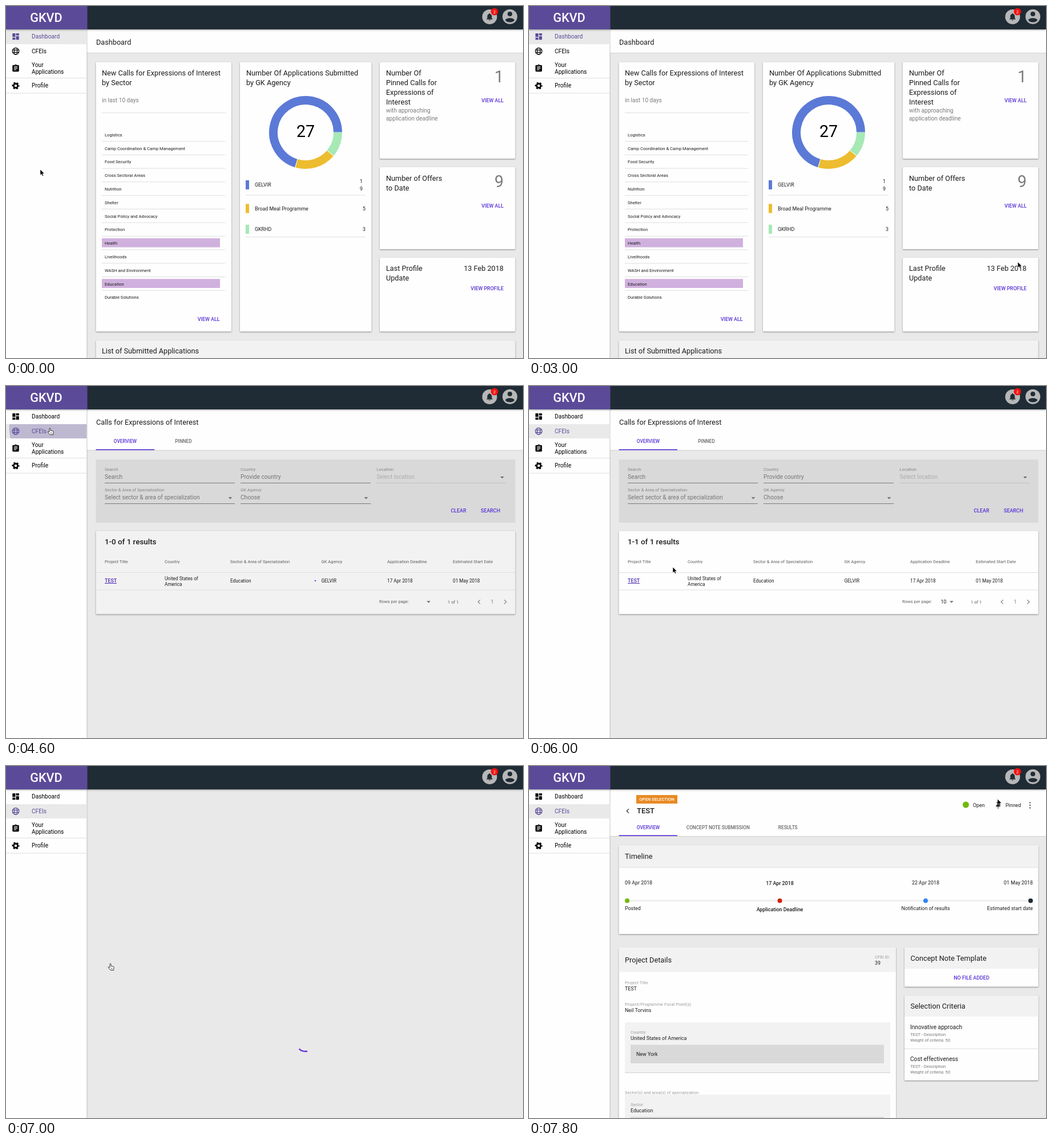
Write an HTML page that moves like this. It is 906x618 px and loops after 8 s.

```html
<!DOCTYPE html>
<html lang="en">
<head>
<meta charset="utf-8">
<title>Partner portal</title>
<style>
html, body { margin: 0; height: 100%; overflow: hidden; background: #e9e9e9; }
svg { display: block; width: 100vw; height: 100vh; font-family: Roboto, sans-serif; }
.card { filter: drop-shadow(0 1px 1.2px rgba(0, 0, 0, .42)); }
.bar { filter: drop-shadow(0 1px 1.5px rgba(0, 0, 0, .4)); }
.side { filter: drop-shadow(.6px 0 .8px rgba(0, 0, 0, .4)); }
</style>
</head>
<body>
<svg id="stage" viewBox="0 0 906 618"></svg>
<script>
const LOOP = 8000, STEP = 200;
const INK = '#1c1c1c', GREY = '#7b7b7b', PALE = '#9c9c9c', LINK = '#5730d6', PURPLE = '#5b4a98';
const TITLE = 12.7, BODY = 10.16, SMALL = 8.89, CELL = 8.26, TINY = 7.64, BIG = 28.6;

// y is the middle of the capitals
const text = (x, y, size, str, fill = INK, weight = 400, anchor = 'start') =>
  `<text x="${x}" y="${y + size * .36}" font-size="${size}" fill="${fill}" font-weight="${weight}" text-anchor="${anchor}">${str.replace(/&/g, '&amp;')}</text>`;
const lines = (x, y, gap, size, rows, fill) =>
  rows.map((row, i) => text(x, y + i * gap, size, row, fill)).join('');
const link = (x, y, str, anchor = 'end', size = SMALL) => text(x, y, size, str, LINK, 500, anchor);
const rect = (x, y, x2, y2, fill, extra = '') =>
  `<rect x="${x}" y="${y}" width="${x2 - x}" height="${y2 - y}" fill="${fill}" ${extra}/>`;
const card = (x, y, x2, y2, fill = '#fefefe') => rect(x, y, x2, y2, fill, 'class="card" rx="1"');
const rule = (x, x2, y, color = '#dedede', extra = '') =>
  `<path d="M${x} ${y}H${x2}" stroke="${color}" ${extra}/>`;
const dot = (x, y, r, fill) => `<circle cx="${x}" cy="${y}" r="${r}" fill="${fill}"/>`;
const shape = (d, x, y, fill, scale = 1, extra = '') =>
  `<path d="${d}" transform="translate(${x} ${y}) scale(${scale})" fill="${fill}" ${extra}/>`;
const caret = (x, y) => shape('M-3.3-1.6H3.3L0 1.7z', x, y, '#666');
const chevron = (x, y, dir, color = '#888') =>
  shape(`M${-2 * dir}-3.6L${1.8 * dir} 0L${-2 * dir} 3.6`, x, y, 'none', 1, `stroke="${color}" stroke-width="1.3"`);

function arc(cx, cy, r, from, to, color, width) {
  const at = deg => {
    const a = deg * Math.PI / 180;
    return `${cx + r * Math.cos(a)} ${cy + r * Math.sin(a)}`;
  };
  return `<path d="M${at(from)}A${r} ${r} 0 ${to - from > 180 ? 1 : 0} 1 ${at(to)}" fill="none" stroke="${color}" stroke-width="${width}"/>`;
}

function spinner(cx, cy, ms, turn = 0) {
  const grow = (1 - Math.cos(Math.PI * Math.min(1, ms / 700))) / 2;
  const start = turn + ms / 1400 * 360 + grow * 43;
  return arc(cx, cy, 17, start, start + 6 + grow * 250, '#6a35e0', 2.4);
}

const ICONS = {
  board: 'M3 13h8V3H3zm0 8h8v-6H3zm10 0h8V11h-8zm0-18v6h8V3z',
  clip: 'M19 3h-4.2a3 3 0 0 0-5.6 0H5a2 2 0 0 0-2 2v14a2 2 0 0 0 2 2h14a2 2 0 0 0 2-2V5a2 2 0 0 0-2-2zm-7 0a1 1 0 0 1 0 2 1 1 0 0 1 0-2zm2 14H7v-2h7zm3-4H7v-2h10zm0-4H7V7h10z',
  bell: 'M12 22a2 2 0 0 0 2-2h-4a2 2 0 0 0 2 2zm6-6v-5c0-3.1-1.6-5.6-4.5-6.3V4a1.5 1.5 0 0 0-3 0v.7C7.6 5.4 6 7.9 6 11v5l-2 2v1h16v-1z',
  pin: 'M8 3h8v2h-1v6l3 3v2h-5.2v6h-1.6v-6H6v-2l3-3V5H8z'
};
const globe = (x, y, color) => `<g transform="translate(${x} ${y})" fill="none" stroke="${color}" stroke-width="1.2">
  <circle r="5.8"/><ellipse rx="2.6" ry="5.8"/><path d="M-5.2-2H5.2M-5.2 2H5.2"/></g>`;
const gear = (x, y) => `<g transform="translate(${x} ${y})" fill="none" stroke="#000">
  <circle r="3.6" stroke-width="2.6"/><circle r="5.4" stroke-width="2.2" stroke-dasharray="2.9 2.755" stroke-dashoffset="1.45"/></g>`;

const SECTORS = ['Logistics', 'Camp Coordination & Camp Management', 'Food Security', 'Cross Sectoral Areas',
  'Nutrition', 'Shelter', 'Social Policy and Advocacy', 'Protection', 'Health', 'Livelihoods',
  'WASH and Environment', 'Education', 'Durable Solutions'];

function dashboard() {
  const sectors = SECTORS.map((name, i) => {
    const y = 226 + 23.8 * i;
    const mark = name === 'Health' || name === 'Education' ? rect(168, y - 8.6, 375, y + 7.2, '#d0b1de') : '';
    return mark + text(173, y, TINY, name) + (i < 12 ? rule(168, 384, y + 11.5) : '');
  }).join('');
  const agencies = [['Broad Meal Programme', 355.5, '#edbc2f', '5'], ['GKRHD', 392, '#a6e9b5', '3']]
    .map(([name, y, color, n]) => rect(420, y - 8, 426, y + 8, color) + text(436, y, SMALL, name) + text(630, y, SMALL, n, INK, 400, 'end'))
    .join('');
  return rect(142, 41, 906, 82, '#fefefe') + rule(142, 906, 82.5, '#d2d2d2') + text(158, 63.5, TITLE, 'Dashboard')
    + card(157.5, 98.5, 395, 571.5)
    + lines(168, 117.5, 17, TITLE, ['New Calls for Expressions of Interest', 'by Sector'])
    + text(168, 165, BODY, 'in last 10 days', GREY) + rule(168, 385, 187.5) + sectors + link(374.5, 549.5, 'VIEW ALL')
    + card(410, 98.5, 640.5, 571.5)
    + lines(421, 117.5, 17, TITLE, ['Number Of Applications Submitted', 'by GK Agency'])
    + arc(525, 222, 56.5, 0, 39.5, '#a6e9b5', 15) + arc(525, 222, 56.5, 40.5, 106.2, '#edbc2f', 15)
    + arc(525, 222, 56.5, 107.2, 359.5, '#5b79d6', 15) + text(525, 220, 28.6, '27', '#000', 400, 'middle')
    + rect(420, 306, 426, 322, '#5b79d6') + text(436, 314, SMALL, 'GELVIR') + lines(620, 307.5, 13, SMALL, ['1', '9'])
    + agencies + rule(420, 630, 332) + rule(420, 630, 405.5)
    + card(655, 98.5, 892.5, 268)
    + lines(666, 117.5, 17, TITLE, ['Number Of', 'Pinned Calls for', 'Expressions of', 'Interest'])
    + lines(666, 183.5, 13.5, BODY, ['with approaching', 'application deadline'], GREY)
    + text(872, 123.5, BIG, '1', GREY, 400, 'end') + link(872, 166, 'VIEW ALL')
    + card(655, 283, 892.5, 427) + lines(666, 302, 17, TITLE, ['Number of Offers', 'to Date'])
    + text(872, 308, BIG, '9', GREY, 400, 'end') + link(872, 351, 'VIEW ALL')
    + card(655, 442, 892.5, 571.5) + lines(666, 460.5, 17, TITLE, ['Last Profile', 'Update'])
    + text(872, 460.5, TITLE, '13 Feb 2018', INK, 400, 'end') + link(872, 495.5, 'VIEW PROFILE')
    + card(157.5, 587, 892.5, 640, '#f2f2f2') + text(168, 605, TITLE, 'List of Submitted Applications');
}

function field(x, y, label, hint, options = {}) {
  const faded = options.disabled;
  return text(x, y, TINY, label, '#858585') + text(x, y + 13.5, BODY, hint, faded ? '#ababab' : '#757575')
    + rule(x, x + 228, y + 24.3, faded ? '#999' : '#777', faded ? 'stroke-dasharray="1.2 1.8"' : '')
    + (options.menu ? caret(x + 220, y + 14.5) : '');
}

const tab = (x, y, name, active) => text(x, y, CELL, name, active ? LINK : '#686868', 500, 'middle');

function calls(t) {
  const loading = t < 5000;
  const heads = [[173, 'Project Title'], [278, 'Country'], [393, 'Sector & Area of Specialization'], [552.5, 'GK Agency'],
    [668, 'Application Deadline'], [783, 'Estimated Start Date']];
  const cells = [[393, 'Education'], [552.5, 'GELVIR'], [668, '17 Apr 2018'], [783, '01 May 2018']];
  return rect(142, 41, 906, 112.5, '#fefefe') + rule(142, 906, 113, '#d2d2d2')
    + text(158, 63.5, TITLE, 'Calls for Expressions of Interest')
    + tab(209, 97.5, 'OVERVIEW', true) + tab(311, 97.5, 'PINNED') + rect(157.5, 111, 260, 112.6, LINK)
    + rect(157.5, 129, 892.5, 240, '#d9d9d9')
    + field(173, 146, 'Search', 'Search') + field(411, 146, 'Country', 'Provide country')
    + field(649.5, 146, 'Location', 'Select location', { menu: true, disabled: true })
    + field(173, 182.3, 'Sector & Area of Specialization', 'Select sector & area of specialization', { menu: true })
    + field(411, 182.3, 'GK Agency', 'Choose', { menu: true })
    + link(793, 218.5, 'CLEAR', 'middle') + link(849, 218.5, 'SEARCH', 'middle')
    + card(157.5, 254.5, 892.5, 400.5, loading ? '#f2f2f2' : '#fefefe')
    + text(173, 273, 13.4, `1-${loading ? 0 : 1} of 1 results`, INK, 500)
    + heads.map(([x, name]) => text(x, 308.5, TINY, name, '#5c5c5c')).join('')
    + rule(157.5, 892.5, 327.5) + text(173, 342, SMALL, 'TEST', '#4d2bb0', 500) + rule(173, 194, 346.5, '#4d2bb0')
    + lines(278, 338, 10, CELL, ['United States of', 'America'])
    + cells.map(([x, name]) => text(x, 342.3, CELL, name)).join('') + rule(157.5, 892.5, 358)
    + text(654, 378.5, TINY, 'Rows per page:', '#5c5c5c') + (loading ? '' : text(721.5, 378.5, SMALL, '10'))
    + caret(740.5, 379) + text(774, 379, TINY, '1 of 1', '#5c5c5c')
    + chevron(829, 379, -1) + text(852, 379, SMALL, '1', GREY, 400, 'middle') + chevron(875, 379, 1)
    + (loading ? spinner(525, 341, t - 4600) : '');
}

const panel = (x, y, x2, y2, head, title) => card(x, y, x2, y2) + rect(x, y, x2, head, '#f2f2f2')
  + text(x + 10.5, (y + head) / 2, TITLE, title);

function details() {
  const steps = [[172, 168, '09 Apr 2018', 'Posted', '#70b90a', 'start'], [439.5, 439.5, '17 Apr 2018', 'Application Deadline', '#d4200c', 'middle'],
    [695, 695, '22 Apr 2018', 'Notification of results', '#2f86f5', 'middle'], [879, 883, '01 May 2018', 'Estimated start date', '#1f2c35', 'end']];
  const pair = (x, y, label, value) => text(x, y, TINY, label, PALE) + text(x, y + 10.4, SMALL, value);
  const criterion = (y, name) => text(668, y, BODY, name)
    + lines(668, y + 12.3, 10, TINY, ['TEST - Description', 'Weight of criteria: 50'], '#777');
  return rect(142, 41, 906, 123, '#fefefe') + rule(142, 906, 123.5, '#d2d2d2')
    + rect(188, 51, 260, 66, '#e88a23') + text(224, 58.7, TINY, 'OPEN SELECTION', '#fff', 500, 'middle')
    + chevron(173, 79, -1, '#333') + text(189, 78.5, 13, 'TEST', INK, 500)
    + tab(209, 108, 'OVERVIEW', true) + tab(331.3, 108, 'CONCEPT NOTE SUBMISSION') + tab(453.7, 108, 'RESULTS')
    + rect(157.5, 121.4, 260, 123, LINK)
    + dot(765.5, 68, 5.5, '#70b90a') + text(778, 69, SMALL, 'Open') + shape(ICONS.pin, 814.4, 61, '#222', .635)
    + text(835, 69, SMALL, 'Pinned') + [64.5, 69, 73.5].map(y => dot(878, y, 1.3, '#666')).join('')
    + panel(157.5, 139, 892.5, 295, 178, 'Timeline') + rule(157.5, 892.5, 178) + rect(172, 235, 879, 238, '#eee')
    + steps.map(([x, tx, date, name, color, anchor], i) => {
      const shift = i === 1 ? 1.5 : 0, weight = shift ? 500 : 400;
      return dot(x, 236.5, 4, color) + text(tx, 204.5 + shift, SMALL, date, INK, weight, anchor)
        + text(tx, 250 + shift, SMALL, name, INK, weight, anchor);
    }).join('')
    + panel(157.5, 318.5, 643, 640, 362, 'Project Details') + pair(606, 335, 'CFEI ID:', '39')
    + pair(168, 380, 'Project Title', 'TEST') + pair(168, 418, 'Project/Programme Focal Point(s)', 'Neil Torvins')
    + rect(168, 450, 633, 538, '#f2f2f2') + rule(168, 633, 538.5, '#d0d0d0')
    + pair(178, 467, 'Country', 'United States of America')
    + rect(178, 489.5, 622, 522, '#d9d9d9') + text(188, 506, SMALL, 'New York')
    + text(168, 573, TINY, 'Sector(s) and area(s) of specialization', PALE)
    + rect(168, 577, 633, 618, '#f2f2f2') + pair(178, 594, 'Sector', 'Education') + rect(178, 616, 622, 618, '#d9d9d9')
    + panel(658, 318.5, 892.5, 387.5, 356, 'Concept Note Template') + link(775.5, 372, 'NO FILE ADDED', 'middle')
    + panel(658, 403, 892.5, 552, 440, 'Selection Criteria')
    + criterion(458.5, 'Innovative approach') + rule(658, 892.5, 496.5) + criterion(514.5, 'Cost effectiveness');
}

function chrome(t) {
  const home = t < 4600, onCalls = t >= 4200;
  const tint = on => on ? PURPLE : '#000';
  const row = (y, y2, on) => on ? rect(0, y, 141.5, y2, '#e9e9e9') : '';
  const [radius, alpha] = { 4400: [5.5, .35], 4600: [71.5, .3], 4800: [82, .13] }[t] || [0, 0];
  return rect(0, 41, 141.5, 618, '#fefefe', 'class="side"')
    + row(41, 67, home) + row(67, 92, onCalls)
    + `<clipPath id="row"><rect y="67" width="141.5" height="25"/></clipPath>`
    + `<circle cx="77" cy="74" r="${radius}" fill="${PURPLE}" opacity="${alpha}" ${t > 4400 ? 'clip-path="url(#row)"' : ''}/>`
    + shape(ICONS.board, 9.4, 46, tint(home), .635) + text(45, 53.5, BODY, 'Dashboard', tint(home))
    + globe(17, 79.3, tint(onCalls)) + text(45, 79, BODY, 'CFEIs', tint(onCalls))
    + shape(ICONS.clip, 9.4, 101.8, '#000', .635) + lines(45, 103, 12.3, BODY, ['Your', 'Applications'], '#000')
    + rule(0, 141.5, 126.5) + gear(17, 140) + text(45, 139.5, BODY, 'Profile', '#000') + rule(0, 141.5, 153)
    + rect(0, 0, 906, 41, '#1f2c35', 'class="bar"') + rect(0, 0, 142.5, 41, PURPLE)
    + text(70.5, 20, 21.6, 'GKVD', '#fff', 500, 'middle')
    + dot(847.5, 19, 13, '#b7b7b7') + shape(ICONS.bell, 839.5, 11, '#1f2c35', .66)
    + dot(856, 10, 6.3, '#f3120e') + text(856, 10, 7.2, '2', '#fff', 400, 'middle')
    + dot(883, 18.7, 13, '#b7b7b7') + dot(883, 14, 4.1, '#1f2c35')
    + shape('M-8 3.6C-7-1.3 7-1.3 8 3.6C5 8.4-5 8.4-8 3.6z', 883, 21.3, '#1f2c35');
}

// time, x, y of the pointer
const PATH = [[0, 60, 287], [400, 60, 287], [1600, 861, 157], [1800, 861, 157], [2400, 861, 342], [2600, 861, 342],
  [3200, 855, 487], [3400, 855, 487], [4200, 77, 74], [4800, 77, 74], [6000, 252, 318], [6600, 183, 347],
  [7200, 183, 347], [7800, 821, 58], [8000, 821, 58]];

function pointer(t) {
  const i = PATH.findIndex(key => key[0] > t);
  const [t0, x0, y0] = PATH[i - 1], [t1, x1, y1] = PATH[i];
  const p = (t - t0) / (t1 - t0), e = p * p * (3 - 2 * p);
  const x = x0 + (x1 - x0) * e, y = y0 + (y1 - y0) * e;
  const hand = (t >= 4200 && t <= 4800) || (t >= 6600 && t <= 7200);
  return hand
    ? shape('M-1 1a1 1 0 0 1 2 0v3.2l4 .8q1.4.3 1.2 1.6L5.6 10v1.5H.2L-3.6 7.2q-.8-1.4.8-1.4L-1 7z', x, y, '#fff', 1,
      'stroke="#222" stroke-width=".9"') + shape('M1.4 7.4v2.4M3.2 7.4v2.4', x, y, 'none', 1, 'stroke="#222" stroke-width=".6"')
    : shape('M0 0V10l2.3-2.1L4 11.6l1.6-.7L4 7.3h3.2z', x, y, '#000', 1, 'stroke="#fff" stroke-width=".5"');
}

function scene(t) {
  if (t < 4600) return dashboard();
  if (t < 6800) return calls(t);
  return t < 7200 ? spinner(525, 484, t - 6800, 20) : details();
}

const stage = document.getElementById('stage');
const begin = performance.now();
let shown = -1;
function draw() {
  const t = Math.floor((performance.now() - begin) % LOOP / STEP) * STEP;
  if (t !== shown) {
    shown = t;
    stage.innerHTML = rect(0, 0, 906, 618, '#e9e9e9') + scene(t) + chrome(t) + pointer(t);
  }
  requestAnimationFrame(draw);
}
draw();
</script>
</body>
</html>
```
